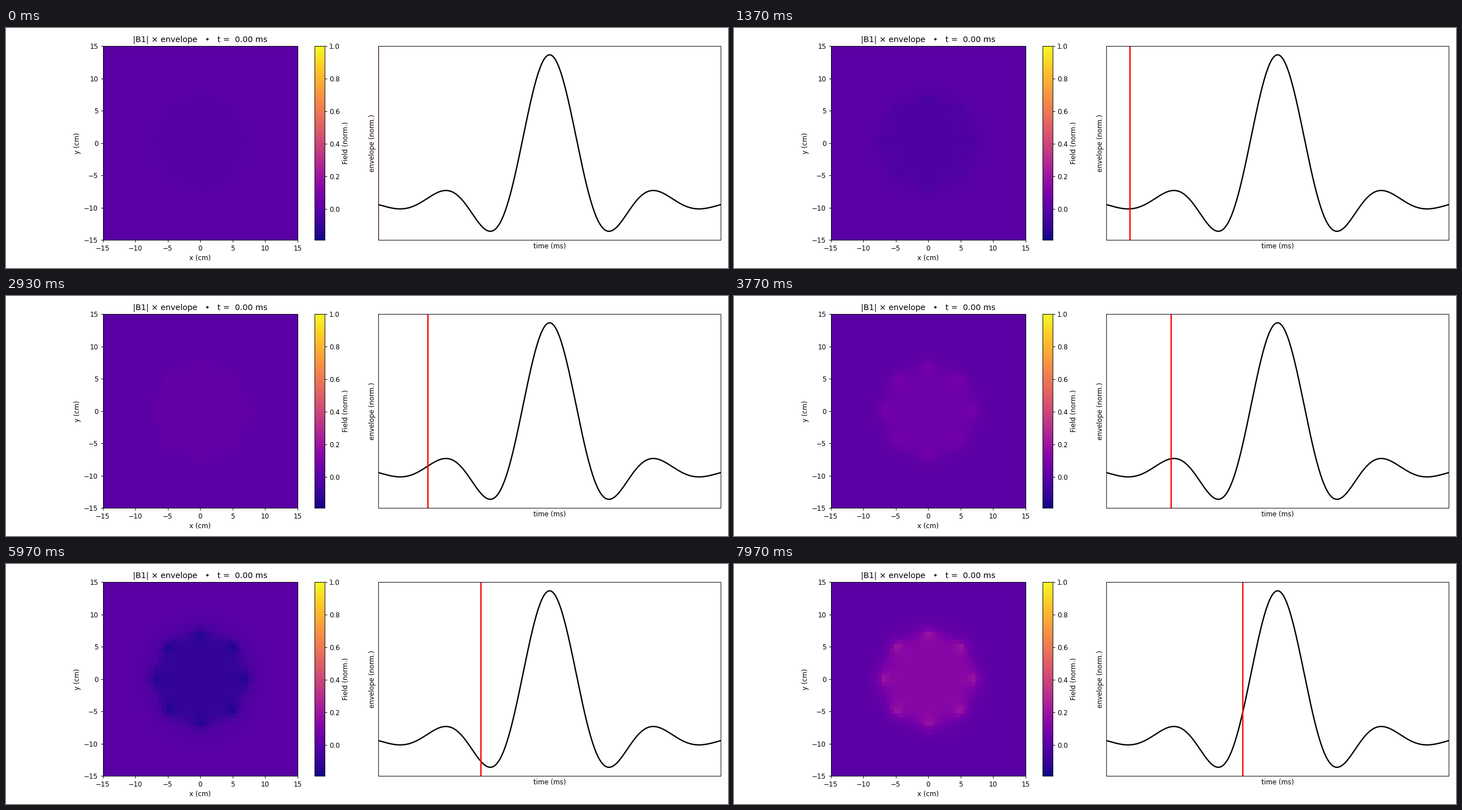
Recreate the animation shown at these times as a matplotlib script. Size 1280 px wide and 427 px high, loop 8 s.

```python
import numpy as np
import matplotlib.pyplot as plt
from matplotlib.animation import FuncAnimation

W, H, DPI = 1280, 427, 256 / 3
FRAMES, LOOP_MS = 240, 8000
SAMPLES, GRID = 600, 50
RUNGS, RADIUS = 8, 7.2

plt.rcParams["font.family"] = "DejaVu Sans"


def pulse_envelope(u):
    """Apodised sinc with slightly widening outer lobes, peak 1."""
    phase = u * (4.11 - 0.33 * u**2 + 0.10 * u**4)
    env = np.sinc(phase) * np.exp(-1.1 * u**2)
    return env / env.max()


def coil_field():
    """Magnitude of the rotating field in a birdcage coil, softened at the rungs."""
    x, y = np.meshgrid(*[np.linspace(-15, 15, GRID)] * 2)
    z = x + 1j * y
    field = 1 / np.sqrt(np.abs(1 - (z / RADIUS) ** RUNGS) ** 2 + 1)
    field[np.abs(z) > 7.5] *= 0.72
    return field / field.max()


def add_axes(fig, left, right, top=32, bottom=377.4):
    return fig.add_axes([left / W, 1 - bottom / H, (right - left) / W, (bottom - top) / H])


time = np.arange(SAMPLES)
env = pulse_envelope(np.linspace(-1, 1, SAMPLES))
field = coil_field()

fig = plt.figure(figsize=(W / DPI, H / DPI), dpi=DPI, facecolor="white")

ax_field = add_axes(fig, 171.6, 516.9)
image = ax_field.imshow(field * env[0], cmap="plasma", origin="lower",
                        extent=[-15, 15, -15, 15], aspect="auto",
                        interpolation="nearest", vmin=env.min(), vmax=1)
ticks = np.arange(-15, 16, 5)
ax_field.set(xlabel="x (cm)", ylabel="y (cm)", xticks=ticks, yticks=ticks)
ax_field.set_title("|B1| × envelope   •   t =  0.00 ms")

ax_bar = add_axes(fig, 547.2, 564.5)
fig.colorbar(image, cax=ax_bar, label="Field (norm.)")

ax_env = add_axes(fig, 660.3, 1267.2)
ax_env.plot(time, env, "k", lw=2)
cursor = ax_env.axvline(0, color="r", lw=2)
ax_env.set(xlim=(0, SAMPLES - 1), xticks=[], yticks=[],
           xlabel="time (ms)", ylabel="envelope (norm.)")


def update(i):
    image.set_data(field * env[i])
    cursor.set_xdata([i, i])
    return image, cursor


anim = FuncAnimation(fig, update, frames=FRAMES, interval=LOOP_MS / FRAMES,
                     repeat=True, repeat_delay=0)
plt.show()
```
